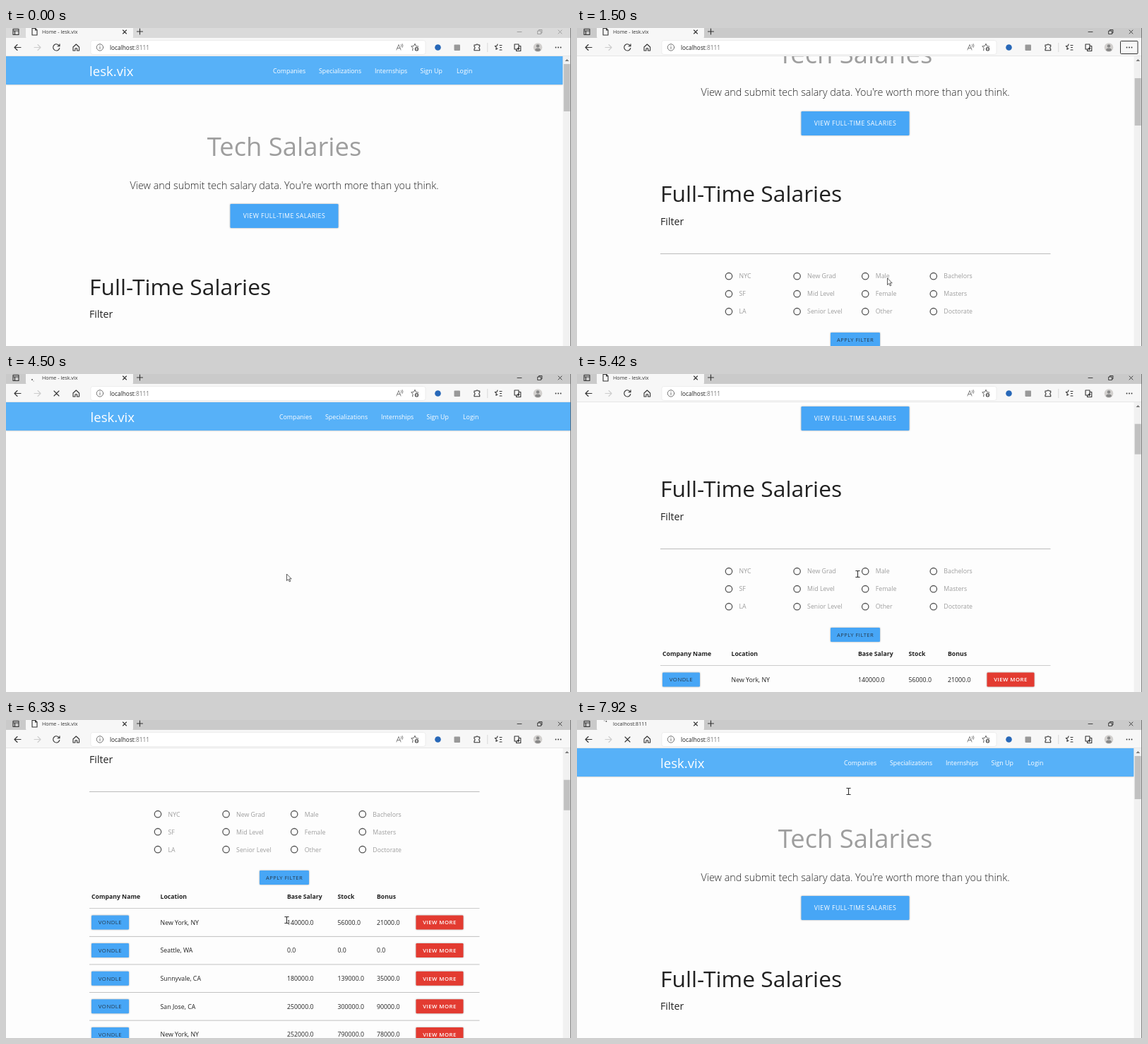
An HTML page for the animation above (8000 ms loop, 800 by 450 pixels).

```html
<!DOCTYPE html>
<html lang="en">
<head>
<meta charset="utf-8">
<title>Tech Salaries</title>
<style>
html, body { margin: 0; width: 100%; height: 100%; overflow: hidden; background: #fdfdfd; }
svg { display: block; width: 800px; height: 450px; font-family: "Open Sans", "Noto Sans", sans-serif; font-size: 8.8px; }
text { white-space: pre; }
.btn { letter-spacing: .45px; text-anchor: middle; }
.icon { fill: none; stroke: #333; stroke-width: 1.1; stroke-linecap: round; stroke-linejoin: round; }
.shadow { filter: drop-shadow(0 .8px .8px rgba(0, 0, 0, .35)); }
</style>
</head>
<body>
<svg id="stage" viewBox="0 0 800 450"></svg>
<script>
const LOOP = 8000;
const BRAND = 'lesk.vix';
const FILTER = 'vondle';
const stage = document.getElementById('stage');

const text = (x, y, str, attrs = '') => `<text x="${x}" y="${y}" ${attrs}>${str}</text>`;
const rect = (x, y, w, h, fill, attrs = '') =>
  `<rect x="${x}" y="${y}" width="${w}" height="${h}" fill="${fill}" ${attrs}/>`;
const path = (d, attrs = '') => `<path class="icon" d="${d}" ${attrs}/>`;
const group = (id, body, attrs = '') => `<g id="${id}" ${attrs}>${body}</g>`;
const button = (x, y, w, h, label, fill, color, size, attrs = '') =>
  rect(x, y, w, h, fill, 'rx="1.2" class="shadow"') +
  text(x + w / 2, y + h / 2 + size * .36, label, `class="btn" fill="${color}" font-size="${size}" ${attrs}`);

function navBar() {
  const links = [[378, 'Companies'], [443, 'Specializations'], [522, 'Internships'], [586.5, 'Sign Up'], [638, 'Login']];
  return rect(0, 39, 788.5, 41, '#57b1f8', 'id="navBg" class="shadow"') +
    text(118, 68, BRAND, 'id="brand" font-size="18.6" fill="#fff"') +
    group('links', links.map(([x, label]) => text(x, 64, label)).join(''), 'fill="#fff" font-weight="500"');
}

function hero() {
  return text(394, 181, 'Tech Salaries', 'font-size="36.4" fill="#9e9e9e" text-anchor="middle"') +
    text(394, 227.5, "View and submit tech salary data. You're worth more than you think.",
      'font-size="14.4" font-weight="300" fill="#222" text-anchor="middle"') +
    button(317.5, 249, 153, 34, 'VIEW FULL-TIME SALARIES', '#47a6f6', '#fff', 8.8, 'font-weight="500"') +
    text(118, 377.5, 'Full-Time Salaries', 'font-size="31.8" fill="#212121"') +
    text(118, 410, 'Filter', 'font-size="14.2" fill="#212121"');
}

function filterForm() {
  const options = [
    ['NYC', 'SF', 'LA'], ['New Grad', 'Mid Level', 'Senior Level'],
    ['Male', 'Female', 'Other'], ['Bachelors', 'Masters', 'Doctorate']
  ];
  const radios = options.map((column, c) => column.map((label, r) => {
    const x = 215 + 96.6 * c, y = 482.2 + 25 * r;
    return `<circle cx="${x}" cy="${y}" r="4.7" fill="none" stroke="#555" stroke-width="1.3"/>` +
      text(x + 14.5, y + 3.3, label, 'fill="#9e9e9e"');
  }).join('')).join('');
  return rect(118, 450, 552.5, 1, '#bbb', 'id="line"') +
    text(118, 439, '', 'id="typed" font-size="9.5" fill="#222"') +
    radios + button(359, 562, 70, 20, 'APPLY FILTER', '#47a6f6', '#263a4d', 7.6);
}

function tableHead(columns) {
  const names = ['Company Name', 'Location', 'Base Salary', 'Stock', 'Bonus'];
  return names.map((name, i) =>
    text(columns[i], 602, name, 'font-weight="700" font-size="8.7" fill="#222"')).join('') +
    rect(118, 615, 552.5, 1, '#ccc');
}

function results() {
  const columns = [121, 218.5, 398, 469.5, 525];
  const rows = [
    ['New York, NY', 140, 56, 21], ['Seattle, WA', 0, 0, 0], ['Sunnyvale, CA', 180, 139, 35],
    ['San Jose, CA', 250, 300, 90], ['New York, NY', 252, 790, 78]
  ];
  return tableHead(columns) + rows.map(([city, ...pay], i) => {
    const y = 635.5 + 39.6 * i;
    return button(121, y - 10, 53, 20, 'VONDLE', '#47a6f6', '#263a4d', 7.8) +
      text(columns[1], y + 3.3, city, 'fill="#222"') +
      pay.map((n, k) => text(columns[k + 2], y + 3.3, (n * 1000).toFixed(1), 'fill="#222"')).join('') +
      button(580.5, y - 10, 67, 20, 'VIEW MORE', '#e33b31', '#fff', 7.8, 'font-weight="600"') +
      rect(118, y + 19.4, 552.5, .9, '#bbb');
  }).join('');
}

function browser() {
  const dots = [778.5, 782, 785.5].map(x => `<circle cx="${x}" cy="27.5" r=".9" fill="#333"/>`).join('');
  return rect(0, 0, 800, 14.5, '#cacaca', 'id="strip"') +
    rect(0, 14, 800, 26, '#f7f7f7') + rect(28, -4, 152, 19, '#f7f7f7', 'rx="3"') +
    rect(0, 39.4, 800, .6, '#ddd') +
    path('M10 1.5h8v8h-8zM10 4h8M12.5 4v5.5') +
    path('M37 .5h4.5l2.5 2.5v7h-7zM41.5 .5v2.5h2.5', 'id="file" stroke-width=".9"') +
    '<g id="spinner"><circle cx="37" cy="8" r=".9" fill="#444"/><circle cx="39" cy="10" r=".6" fill="#777"/></g>' +
    text(51, 8.2, '', 'id="tab" font-size="7.2" fill="#333"') +
    path('M165.5 3l5 5m0-5l-5 5M185.5 5h8M189.5 1v8') +
    path('M724 5.5h6M753 4h4.5v4.5h-4.5zM754.5 4v-1.5h4.5v4.5h-1.5M782 3l5 5m0-5l-5 5', 'id="winButtons" style="stroke-width:.9"') +
    path('M21 27.5h-9m4-4l-4 4l4 4') +
    path('M40 27.5h9m-4-4l4 4l-4 4', 'style="stroke:#ccc"') +
    path('M75.5 25.5a4.6 4.6 0 1 0 .3 3M76 22.8v3h-3', 'id="reload"') +
    path('M68 24l7 7m0-7l-7 7', 'id="stop"') +
    path('M95 27l4.3-4l4.3 4v5h-3v-3.2h-2.6v3.2h-3z') +
    rect(120, 17.5, 474, 20, '#fff', 'rx="3" stroke="#e4e4e4" stroke-width=".6"') +
    path('M133 26.5v3M133 24.6v.1M137.7 27.4a4.7 4.7 0 1 1-9.4 0a4.7 4.7 0 1 1 9.4 0', 'style="stroke:#666;stroke-width:.9"') +
    text(147, 30.5, 'localhost<tspan fill="#777">:8111</tspan>', 'font-size="8.3" fill="#222"') +
    path('M553 31l3-7.5l3 7.5M554 28.5h4M559.5 23.5q1.2 1.5 0 3M561.2 22.5q1.8 2.5 0 5', 'style="stroke:#666;stroke-width:.8"') +
    path('M579 22.5l1.5 3.2l3.4.4M576 31.5l-.5.3l.7-3.5l-2.5-2.4l3.6-.4l1.7-3', 'style="stroke:#555;stroke-width:.9"') +
    '<circle cx="581.5" cy="29.8" r="2.8" fill="#555"/>' + path('M580 29.8h3M581.5 28.3v3', 'style="stroke:#fff;stroke-width:.8"') +
    '<circle cx="611.5" cy="27.5" r="4.3" fill="#2868b8"/>' + rect(634.5, 23.5, 8.5, 8.5, '#999', 'rx="1"') +
    path('M663 24h2.5a1.6 1.6 0 0 1 3 0h2.2v2.4a1.6 1.6 0 0 0 0 3v2.4h-7.7v-2.4a1.6 1.6 0 0 0 0-3z') +
    rect(681.5, 21, .7, 13, '#ccc') +
    path('M699 24.5h3M699.5 27.5h2M699 31h3M696 23l-1 2.3l-2.7.3l2 1.8l-.5 2.8l2.2-1.2') +
    path('M720 23h6v7h-6zM722.5 30v2.5h6.3v-7h-2.8M725.5 27.5v3M724 29h3') +
    '<circle cx="753" cy="27.5" r="6.3" fill="#d2d0ce"/><circle cx="753" cy="25.5" r="2.3" fill="#888"/>' +
    '<path d="M749 31.5q0-3 4-3t4 3q-4 3-8 0" fill="#888"/>' +
    dots + rect(769.5, 18.5, 24.5, 18, 'none', 'id="menuRing" rx="1" stroke="#333" stroke-width="1"') +
    rect(799.3, 0, .7, 450, '#555');
}

stage.innerHTML =
  group('page',
    navBar() + group('content', hero() + filterForm() +
      group('headOnly', tableHead([121, 261.5, 371.5, 450, 511])) + group('results', results()))) +
  group('scrollbar', rect(788.5, 40, 11.5, 410, '#f1f1f1') +
    '<path d="M791.5 47l2.8-3l2.8 3z" fill="#777"/>' + rect(789.7, 51, 9, 67, '#c1c1c1', 'id="thumb"')) +
  browser() +
  group('arrow', '<path d="M0 0v9.5l2.2-2l1.6 3.4l1.5-.7l-1.6-3.3h3z" fill="#fff" stroke="#333" stroke-width=".8"/>') +
  group('beam', path('M-2.7-4.5h2l.7.6l.7-.6h2M0-4v8M-2.7 4.5h2l.7-.6l.7.6h2'));

const el = {};
stage.querySelectorAll('[id]').forEach(node => el[node.id] = node);
const show = (node, on) => node.style.display = on ? '' : 'none';
const move = (node, x, y) => node.setAttribute('transform', `translate(${x} ${y})`);
const set = (node, attrs) => { for (const k in attrs) node.setAttribute(k, attrs[k]); };

// Eased value between [time, value] keys.
function track(t, keys) {
  const next = keys.findIndex(k => k[0] > t);
  if (next < 0) return keys[keys.length - 1][1];
  if (next === 0) return keys[0][1];
  const [t0, a] = keys[next - 1], [t1, b] = keys[next];
  const p = (t - t0) / (t1 - t0);
  return a + (b - a) * p * p * (3 - 2 * p);
}

const scrollKeys = [[1000, 0], [1500, 131], [1950, 164], [4450, 164], [4450, 0], [4880, 0],
  [5420, 203], [6200, 349], [7750, 349], [7750, 0]];
const cursorX = [[2050, 439.5], [2550, 397.5], [6850, 397.5], [7350, 384.5]];
const cursorY = [[2050, 354], [2550, 283], [6850, 283], [7350, 101]];

function draw(t) {
  const active = t >= 500;
  const blank = t >= 4450 && t < 4760;
  const reloaded = t >= 7750;
  const loading = t >= 4350 && t < 4850 || reloaded;
  const filtered = t >= 4450;
  const focused = t >= 3600 && t < 4450 || t >= 7380 && !reloaded;
  const scroll = track(t, scrollKeys);

  move(el.page, 0, -scroll);
  show(el.content, !blank);
  show(el.scrollbar, !blank);
  show(el.headOnly, !filtered);
  show(el.results, filtered);
  move(el.brand, blank ? 1.5 : 0, 0);
  move(el.links, blank ? 9 : 0, 0);
  set(el.navBg, { width: blank ? 800 : 788.5 });
  set(el.thumb, {
    y: 51 + scroll * (filtered ? .0966 : .153),
    height: reloaded ? 61 : filtered ? 43 : 67
  });

  set(el.line, { fill: focused ? '#26a69a' : '#bbb', height: focused ? 1.4 : 1 });
  const letters = Math.max(0, Math.floor((t - 3680) / 90));
  el.typed.textContent = t < 4450 ? FILTER.slice(0, letters) : '';

  set(el.strip, { fill: active ? '#cacaca' : '#dadada' });
  el.winButtons.style.stroke = active ? '#333' : '#999';
  show(el.menuRing, active && t < 3600);
  show(el.reload, !loading);
  show(el.stop, loading);
  show(el.file, !loading);
  show(el.spinner, loading);
  set(el.spinner, { transform: `rotate(${(t - 4500) * .36} 40 5.5)` });
  el.tab.textContent = reloaded ? 'localhost:8111' : 'Home - ' + BRAND;

  const beam = t >= 2450 && t < 4400 || t >= 4950;
  const x = track(t, cursorX), y = track(t, cursorY);
  show(el.beam, beam);
  show(el.arrow, active && !beam);
  move(el.beam, x, y);
  move(el.arrow, x, y);
}

function frame() {
  draw(performance.now() % LOOP);
  requestAnimationFrame(frame);
}
frame();
</script>
</body>
</html>
```
